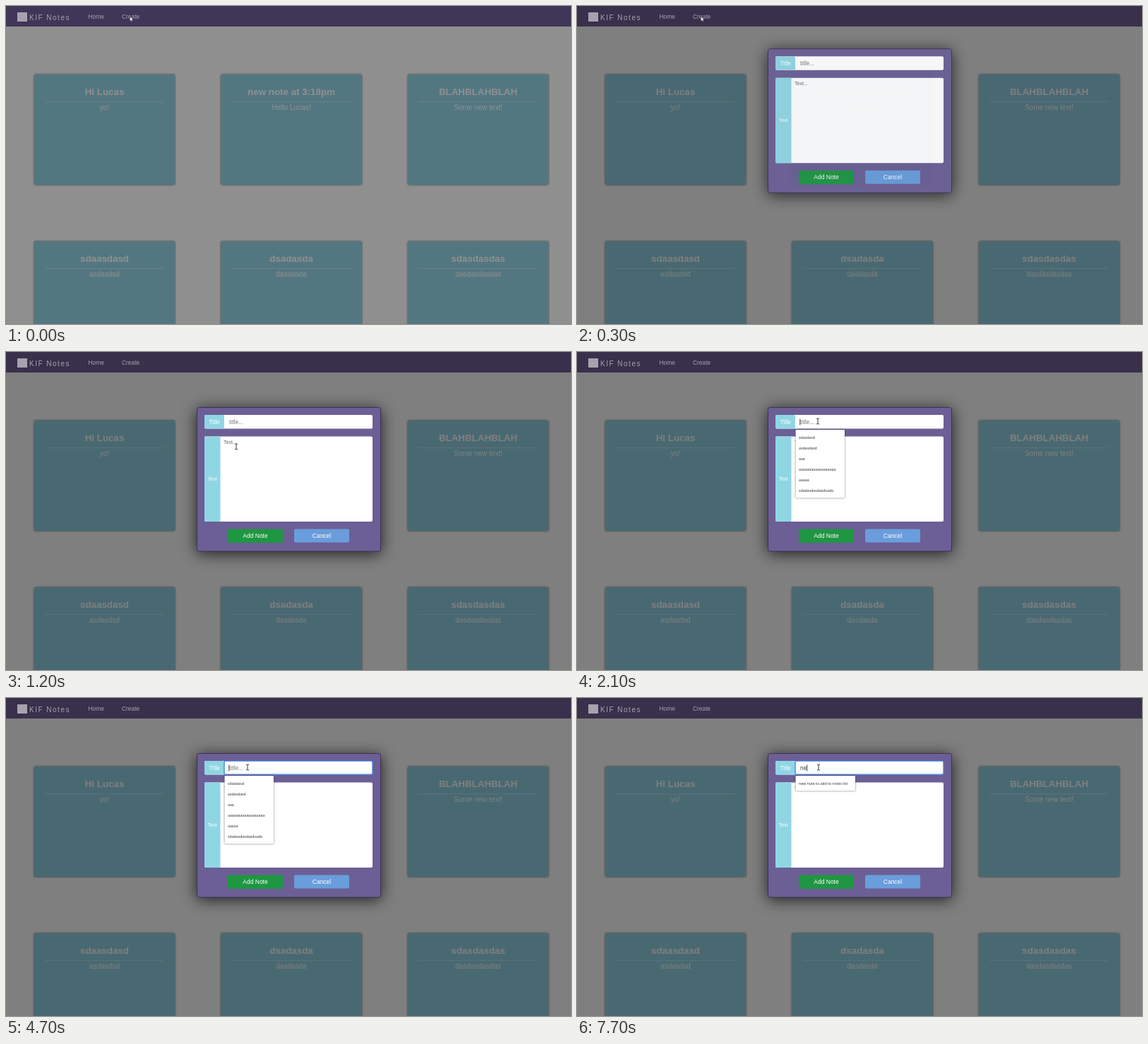
Recreate the animation shown at these times as an HTML page. Size 800 px wide and 450 px high, loop 8000 ms.

```html
<!DOCTYPE html>
<html lang="en">
<head>
<meta charset="utf-8">
<title>Notes</title>
<style>
html, body { margin: 0; height: 100%; overflow: hidden; background: #808080; }
svg { display: block; font-family: "Liberation Sans", Arial, sans-serif; }
.mid { text-anchor: middle; }
.white { fill: #fff; }
.card { fill: #94d4e6; filter: drop-shadow(0 0 1.5px rgba(0,0,0,.6)); }
.panel { fill: #6b5f96; stroke: #3a3350; filter: drop-shadow(0 3px 11px rgba(0,0,0,.75)); }
.label { fill: #8fd6e4; }
.list { fill: #fff; filter: drop-shadow(0 .5px 1px rgba(0,0,0,.6)); }
.small { font: 5.2px "Noto Sans", sans-serif; fill: #333; }
</style>
</head>
<body>
<svg id="stage" width="800" height="450" viewBox="0 0 800 450"></svg>
<script>
const LOOP = 8000;
const stage = document.getElementById('stage');

const rect = (x, y, w, h, attrs = '') =>
  `<rect x="${x}" y="${y}" width="${w}" height="${h}" ${attrs}/>`;
const text = (x, y, size, str, attrs = 'class="white"') =>
  `<text x="${x}" y="${y}" font-size="${size}" ${attrs}>${str}</text>`;
const centred = (x, y, size, str, attrs = '') =>
  text(x, y, size, str, `class="mid white" ${attrs}`);

const notes = [
  ['Hi Lucas', 'yo!'], ['new note at 3:18pm', 'Hello Lucas!'], ['BLAHBLAHBLAH', 'Some new text!'],
  ['sdaasdasd', 'asdasdsd'], ['dsadasda', 'dasdasda'], ['sdasdasdas', 'dasdasdasdas'],
];
const card = ([title, body], i) => {
  const x = 40 + (i % 3) * 264.5, y = i < 3 ? 97 : 333, mid = x + 99.5;
  return rect(x, y, 199, 156, 'rx="2" class="card"') +
    centred(mid, y + 29, 13.35, title, 'font-weight="bold"') +
    rect(x + 15, y + 38, 168, .7, 'fill="#fff" opacity=".5"') +
    centred(mid, y + 49.5, 10, body);
};

const list = (id, width, items) =>
  `<g id="${id}">` + rect(309.5, 110, width, items.length * 15 + 6.5, 'rx="1" class="list"') +
  items.map((s, i) => `<text x="314" y="${122.5 + i * 15}" class="small">${s}</text>`).join('') + '</g>';

stage.innerHTML =
  rect(0, 0, 800, 450, 'fill="#fff"') + notes.map(card).join('') +
  rect(0, 0, 800, 29, 'fill="#72609a"') +
  rect(0, 0, 800, 450, 'id="shade"') +
  '<g fill="#a5a3ae">' + rect(16, 9, 14, 13) +
  text(33, 19.5, 10, 'KIF Notes', 'letter-spacing="1.5"') +
  text(116.5, 17.5, 8.4, 'Home', '') + text(164, 17.5, 8.4, 'Create', '') + '</g>' +
  '<g id="modal">' + rect(270.5, 78.5, 260, 203.5, 'rx="3" class="panel"') +
  rect(281, 89, 238, 19.5, 'rx="2" class="white"') +
  rect(281, 89, 28, 19.5, 'rx="2" class="label"') + centred(295.3, 102, 8.3, 'Title') +
  rect(309, 89.2, 210, 19, 'id="ring" rx="2" fill="none" stroke="#3f7fe0" stroke-width="1.3"') +
  text(316, 102, 8.4, '', 'id="field"') +
  rect(281, 119.5, 238, 120.5, 'rx="2" class="white"') +
  rect(281, 119.5, 22.5, 120.5, 'rx="1" class="label"') + centred(292.2, 182, 7, 'Text') +
  text(308, 130, 7, 'Text...', 'fill="#666"') +
  rect(314, 250.5, 78, 19.5, 'rx="2" fill="#1f9642"') + centred(353, 263.3, 8.5, 'Add Note') +
  rect(408, 250.5, 78, 19, 'rx="2" fill="#6a9ddc"') + centred(447, 263, 8.5, 'Cancel') +
  list('history', 69.5, ['sdasdasd', 'asdasdasd', 'aaa', 'a'.repeat(18), 'aaaaa', 'sdadasdasdasdsada']) +
  list('match', 84.5, ['new note to add to notes list']) +
  rect(0, 94.5, .8, 9, 'id="caret" fill="#222"') + '</g>' +
  '<path id="arrow" d="M0 0V6.4L1.5 5.1 2.5 7.3 3.5 6.8 2.6 4.7H4.6Z" fill="#fff" stroke="#222" stroke-width=".4"/>' +
  '<path id="beam" d="M-2-4Q0-4 0-3Q0-4 2-4M0-3V3M-2 4Q0 4 0 3Q0 4 2 4" fill="none" stroke="#222" stroke-width=".9"/>';

const el = Object.fromEntries([...stage.querySelectorAll('[id]')].map(e => [e.id, e]));
const set = (id, name, value) => el[id].setAttribute(name, value);
const show = (id, on) => set(id, 'visibility', on ? 'visible' : 'hidden');
const clamp = v => Math.min(1, Math.max(0, v));
const smooth = v => v * v * (3 - 2 * v);

// cubic-bezier(0, 0, .58, 1)
function easeOut(p) {
  let lo = 0, hi = 1;
  for (let i = 0; i < 20; i++) {
    const s = (lo + hi) / 2;
    if (1.74 * s * s * (1 - s) + s ** 3 < p) lo = s; else hi = s;
  }
  return 3 * lo * lo - 2 * lo ** 3;
}

// time, x, y
const path = [[300, 175.5, 15], [1000, 326, 134], [1200, 326, 134], [1900, 341, 98], [2200, 341, 98], [2400, 342, 98]];
function pointerAt(t) {
  let i = path.findIndex(p => p[0] > t);
  if (i < 0) return path.at(-1).slice(1);
  if (i === 0) return path[0].slice(1);
  const [a, b] = [path[i - 1], path[i]];
  const k = smooth((t - a[0]) / (b[0] - a[0]));
  return [a[1] + (b[1] - a[1]) * k, a[2] + (b[2] - a[2]) * k];
}

function draw(t) {
  set('shade', 'opacity', t < 100 ? .44 : .5);
  set('modal', 'opacity', t < 100 ? 0 : clamp((t - 28) / 290));
  set('modal', 'transform', `translate(0 ${-51 * (1 - easeOut(clamp((t - 28) / 580)))})`);

  const typed = t < 6200 ? '' : t < 7000 ? 'n' : 'ne';
  el.field.textContent = typed || 'title...';
  set('field', 'fill', typed ? '#444' : '#777');
  set('ring', 'opacity', clamp((t - 2100) / 400));
  show('history', t >= 2100 && t < 4900);
  show('match', t >= 7000);
  show('caret', t >= 2100 && t < 3400 || t >= 4700 && t < 4900 || t >= 6200);
  set('caret', 'x', 315.4 + typed.length * 5);

  const [x, y] = pointerAt(t);
  const inField = x > 309 && y > 89;
  for (const id of ['arrow', 'beam']) set(id, 'transform', `translate(${x} ${y})`);
  show('arrow', !inField);
  show('beam', inField);
}

function tick() {
  draw(Math.floor(performance.now() % LOOP / 100) * 100);
  requestAnimationFrame(tick);
}
tick();
</script>
</body>
</html>
```
